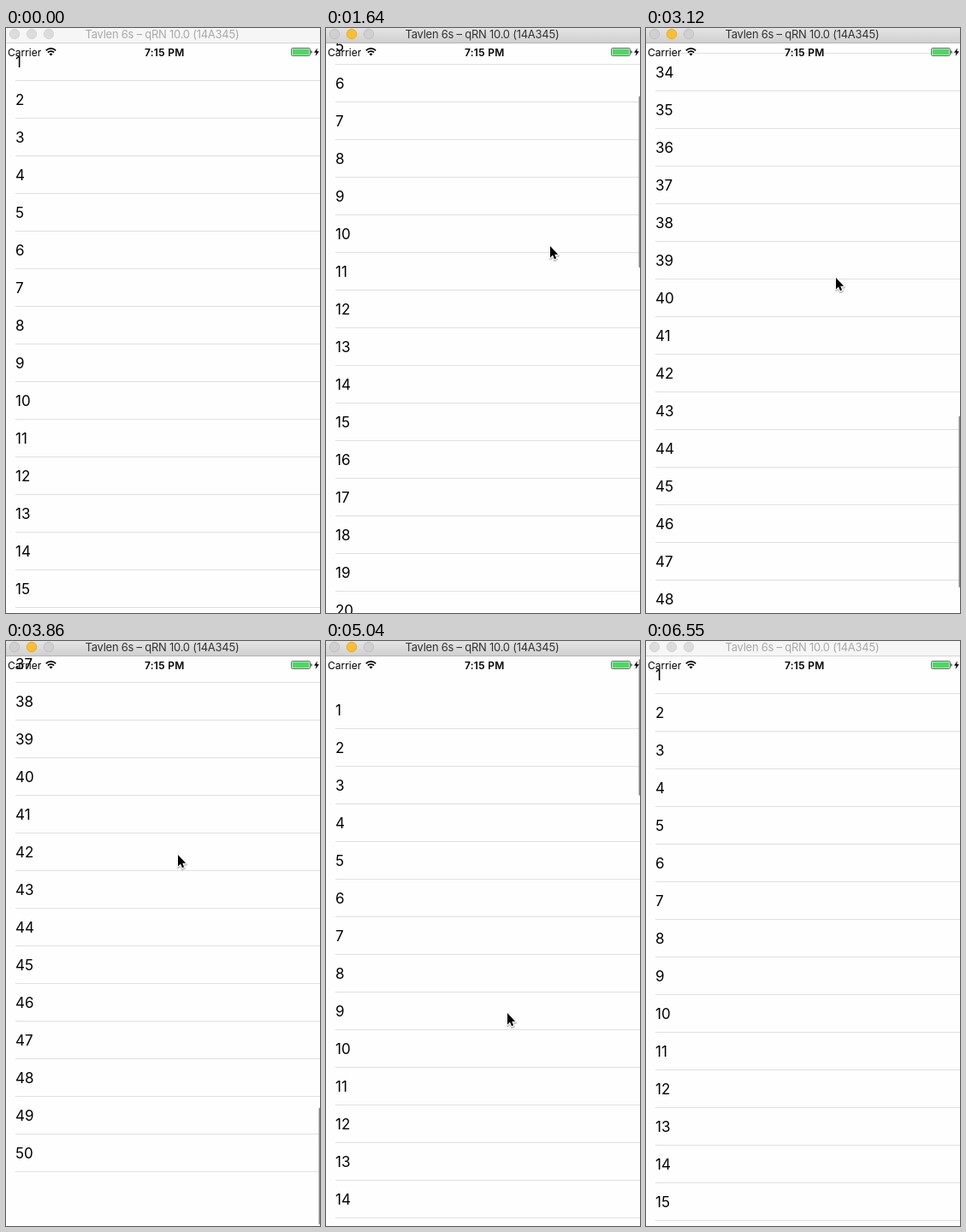
An HTML page for the animation above (6650 ms loop, 367 by 684 pixels).

```html
<!DOCTYPE html>
<html lang="en">
<head>
<meta charset="utf-8">
<title>Scrolling list</title>
<style>
  html, body { margin: 0; width: 100%; height: 100%; overflow: hidden; background: #fefefe; }
  svg { display: block; width: 367px; height: 684px; font-family: Inter, Roboto, sans-serif; }
  #rows text { font-size: 17px; }
  .status { font-size: 12px; }
  #title { font-size: 13px; letter-spacing: -.25px; text-anchor: middle; }
</style>
</head>
<body>
<svg viewBox="0 0 367 684" xmlns="http://www.w3.org/2000/svg">
  <defs>
    <linearGradient id="metal" x1="0" y1="0" x2="0" y2="1">
      <stop offset="0" stop-color="#e4e4e4"/>
      <stop offset="1" stop-color="#d0d0d0"/>
    </linearGradient>
    <path id="arrow" d="M0 0V13.4L3 10.6 5 15.2 7.1 14.3 5.2 9.8H9.2Z"/>
  </defs>
  <rect width="367" height="684" fill="#fefefe"/>
  <g id="rows"></g>
  <rect id="bar" x="365.6" width="2.5" rx="1.2" fill="#858585"/>

  <g class="status">
    <text x="2" y="32.5">Carrier</text>
    <text x="185.3" y="32.5" text-anchor="middle" font-weight="600" letter-spacing=".3">7:15 PM</text>
    <g fill="none" stroke="#000" stroke-width="1.7">
      <path d="M46.8 26.3a8 8 0 0 1 11.4 0"/>
      <path d="M48.9 28.7a5 5 0 0 1 7.2 0"/>
    </g>
    <path d="M50.5 30.4q2-1.6 4 0L52.5 32.5Z"/>
    <rect x="333.5" y="23.5" width="22" height="9" rx="1.6" fill="#fefefe" stroke="#6e6e6e"/>
    <rect x="334.6" y="24.6" width="19.8" height="6.8" rx=".6" fill="#4cd964"/>
    <path d="M356.4 26.2q1.4 .3 1.4 1.8t-1.4 1.8Z" fill="#333"/>
    <path d="M364 23.4L360 28.8H362.6L361.6 33 366 27.3H363.3Z"/>
  </g>

  <rect id="chrome" width="367" height="17"/>
  <rect id="edge" y="17" width="367" height="1"/>
  <g id="lights"></g>
  <text id="title" x="182.5" y="12">Tavlen 6s – qRN 10.0 (14A345)</text>

  <g id="cursor">
    <use href="#arrow" x=".3" y="1.4" fill="none" stroke="#000" stroke-opacity=".22" stroke-width="3" stroke-linejoin="round"/>
    <use href="#arrow" stroke="#fff" stroke-width="2" stroke-linejoin="round"/>
    <use href="#arrow"/>
  </g>
</svg>
<script>
const LOOP = 6650, START = 444, STEP = 148.25, END = 6550, LAST = 40;
const ROWS = 50, PITCH = 44, TOP = 18, MAX = 1533;
const TAU = 3.4, BOUNCE = 8, STRETCH = .655; // times in steps
const NS = 'http://www.w3.org/2000/svg';
const $ = id => document.getElementById(id);
const clamp = (v, lo, hi) => Math.min(hi, Math.max(lo, v));

function add(parent, tag, attrs, text = '') {
  const el = document.createElementNS(NS, tag);
  set(el, attrs);
  el.textContent = text;
  parent.appendChild(el);
}
function set(el, attrs) {
  for (const key in attrs) el.setAttribute(key, attrs[key]);
}

for (let n = 1; n <= ROWS; n++) {
  const bottom = TOP + PITCH * n;
  add($('rows'), 'text', { x: 11, y: bottom - 16 }, n);
  add($('rows'), 'rect', { x: 11, y: bottom - 1, width: 356, height: 1, fill: '#e0e0e2' });
}
for (const cx of [10, 30, 50]) add($('lights'), 'circle', { cx, cy: 7, r: 5.7 });

// Each flick drags the list to a place, then throws it on by `reach`
const flicks = [
  { down: 6.75, up: 8, to: 195, reach: 718.6 },
  { down: 14, up: 16, to: 1000, reach: 989.5 },
  { down: 25, up: 26, to: 1330, reach: -1760.8 }
];

// Slows down exponentially; past an end of the list it springs back
function coast({ to, reach }, dt) {
  const end = reach > 0 ? MAX : 0, gap = end - to;
  const hit = gap / reach < 1 ? -TAU * Math.log(1 - gap / reach) : Infinity;
  if (dt < hit) return to + reach * (1 - Math.exp(-dt / TAU));
  const speed = (reach - gap) / TAU;
  const u = Math.min(1, (dt - hit) / BOUNCE);
  return end + speed * STRETCH * Math.sin(Math.PI * Math.sqrt(u));
}

function scrollAt(step, i = flicks.length - 1) {
  if (i < 0) return 0;
  const f = flicks[i];
  if (step < f.down) return scrollAt(step, i - 1);
  if (step >= f.up) return coast(f, step - f.up);
  const from = scrollAt(f.down, i - 1);
  return from + (f.to - from) * ((step - f.down) / (f.up - f.down)) ** 2;
}

// Pointer turning points: step, x, y
const turns = [
  [0, 362, 520], [6.75, 262, 448], [8, 262, 255], [14, 225, 478], [18, 222, 292],
  [25, 196, 240], [28, 197, 426], [35, 236, 449], [LAST, 290, 672]
];

function pointer(step) {
  const i = Math.max(1, turns.findIndex(p => p[0] >= step));
  const [a, ax, ay] = turns[i - 1], [b, bx, by] = turns[i];
  const u = (step - a) / (b - a), ease = u * u * (3 - 2 * u);
  return [ax + (bx - ax) * ease, ay + (by - ay) * ease].map(Math.round);
}

function drawBar(scroll, shown) {
  const over = Math.max(0, -scroll, scroll - MAX);
  const y = 21.2 + clamp(scroll, 0, MAX) * .3004 + (scroll > MAX ? over : 0);
  set($('bar'), { y, height: 200.5 - over, visibility: shown ? 'visible' : 'hidden' });
}

function drawChrome(active) {
  set($('chrome'), { fill: active ? 'url(#metal)' : '#f6f6f6' });
  set($('edge'), { fill: active ? '#b3b3b3' : '#d3d3d3' });
  set($('title'), { fill: active ? '#333' : '#a9a9a9' });
  [...$('lights').children].forEach((dot, i) => {
    const lit = active && i === 1;
    set(dot, {
      fill: lit ? '#fdbe2f' : active ? '#d0d0d0' : '#dcdcdc',
      stroke: lit ? '#dfa023' : active ? '#bababa' : '#d0d0d0',
      'stroke-width': .8
    });
  });
}

function draw(t) {
  const live = t >= START && t < END;
  const step = live ? Math.min(LAST, Math.floor((t - START) / STEP)) : 0;
  const scroll = Math.round(scrollAt(step));
  set($('rows'), { transform: `translate(0 ${-scroll})` });
  drawBar(scroll, step > flicks[0].down && step < LAST);
  drawChrome(step >= 5);
  const [x, y] = pointer(step);
  set($('cursor'), { transform: `translate(${x} ${y})`, visibility: live ? 'visible' : 'hidden' });
}

const begin = performance.now();
function tick() {
  draw((performance.now() - begin) % LOOP);
  requestAnimationFrame(tick);
}
tick();
</script>
</body>
</html>
```
